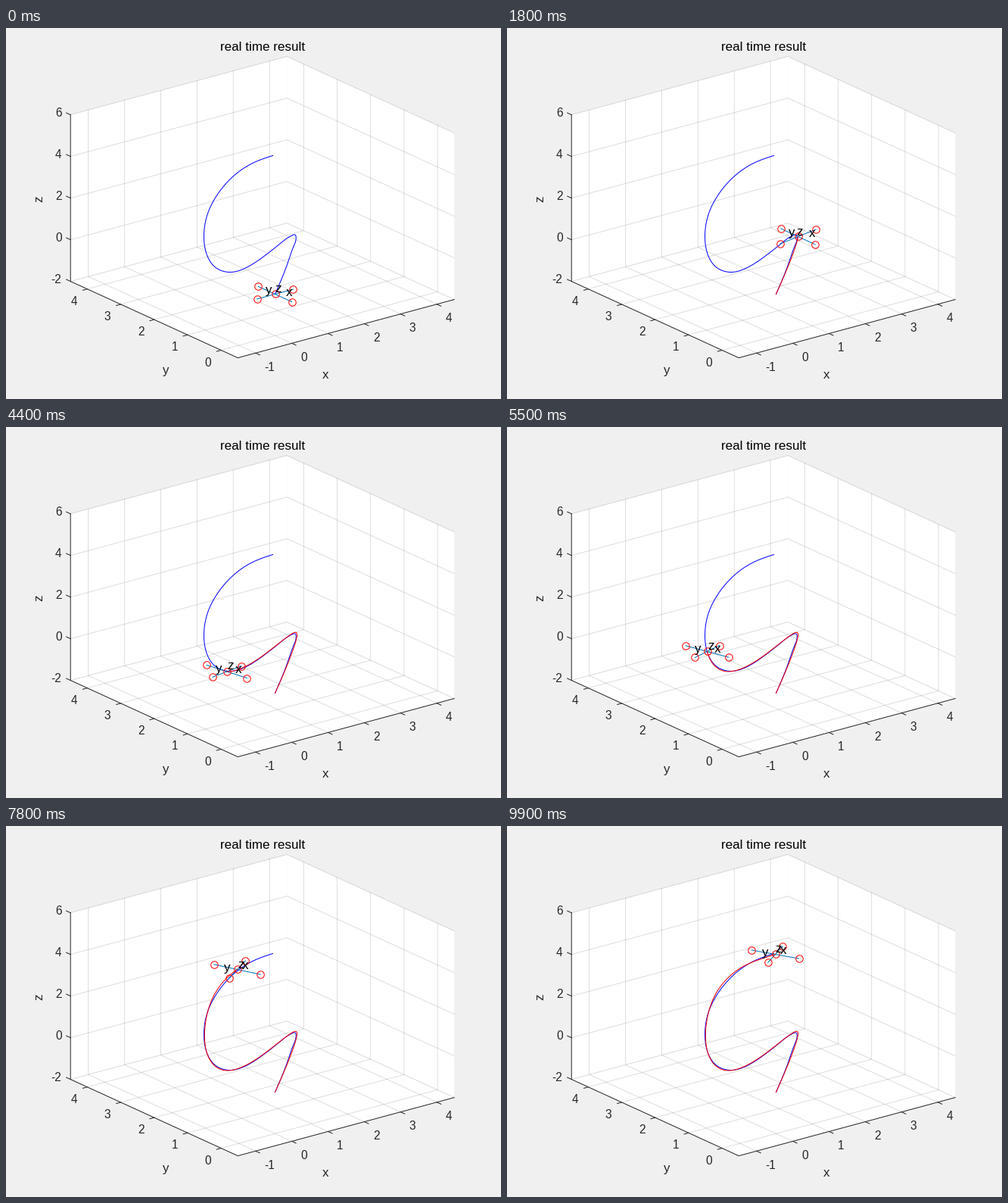
Recreate the animation shown at these times as a matplotlib script. Size 654 by 490 pixels, loop 10 s.

```python
import numpy as np
import matplotlib.pyplot as plt
from matplotlib.animation import FuncAnimation

W, H, DPI = 654, 490, 100
FRAMES, STEP = 100, 100
PX = 72 / DPI                       # one pixel in points
INK = (0.15, 0.15, 0.15)
plt.rcParams["font.family"] = "Liberation Sans"

# Orthographic projection: screen vector of each unit axis
ORIGIN = np.array([355.0, 350.8])
AXES = np.array([[47.9, -12.9], [-44.2, -20.2], [0.0, -27.5]])
XLIM, YLIM, ZLIM = (-1.49, 4.48), (-0.5, 4.5), (-2, 6)


def project(*p):
    return ORIGIN + np.array(p, float) @ AXES


def spline(t, p, q, clamped=False):
    """C2 cubic spline through p at times t, sampled at q."""
    t, p, q = (np.asarray(v, float) for v in (t, p, q))
    n, h = len(t), np.diff(t)
    d = np.diff(p, axis=0) / h[:, None]
    A, r = np.zeros((n, n)), np.zeros_like(p)
    for i in range(1, n - 1):
        A[i, i - 1:i + 2] = h[i], 2 * (h[i - 1] + h[i]), h[i - 1]
        r[i] = 3 * (h[i] * d[i - 1] + h[i - 1] * d[i])
    if clamped:
        A[0, 0] = A[-1, -1] = 1
    else:
        A[0, :2], r[0] = (2, 1), 3 * d[0]
        A[-1, -2:], r[-1] = (1, 2), 3 * d[-1]
    m = np.linalg.solve(A, r)
    k = np.clip(np.searchsorted(t, q, side="right") - 1, 0, n - 2)
    hk = h[k][:, None]
    u = (q - t[k])[:, None] / hk
    return (p[k] * (1 + 2 * u) * (1 - u) ** 2 + m[k] * hk * u * (1 - u) ** 2
            + p[k + 1] * u * u * (3 - 2 * u) + m[k + 1] * hk * u * u * (u - 1))


# Planned path, in screen pixels
plan = np.array([
    (355, 351), (372, 309), (379.5, 288), (382.7, 277), (381.5, 272.6),
    (377, 273.6), (362, 284), (339, 302), (318, 315.5), (295, 322),
    (276, 315.5), (264.2, 297), (261, 275), (265.5, 246), (276.5, 223),
    (291, 204), (307.5, 189), (329, 176.3), (352, 168)])
chord = np.r_[0, np.cumsum(np.hypot(*np.diff(plan, axis=0).T))]
planned = spline(chord, plan, np.linspace(0, chord[-1], 500))

# Flight: time, screen x, screen y, pitch slope, roll slope
flight = np.array([
    (0.0, 355, 351, 0, 0),
    (1.1, 373, 309, 0, -0.09),
    (1.8, 384, 275, 0.2, 0.04),
    (2.2, 380.7, 271, 0.18, 0.04),
    (3.3, 339, 301.4, 0.04, 0.015),
    (4.4, 291.3, 322.5, -0.07, 0),
    (5.5, 264, 296, -0.09, 0),
    (6.6, 268, 238, 0.07, 0.07),
    (6.9, 274.3, 223, 0.1, 0.08),
    (7.8, 305, 189, 0.08, 0.05),
    (8.8, 341, 173.3, 0.03, 0.02),
    (9.9, 354, 169, 0, 0)])
SUB = 5
times = np.arange((FRAMES - 1) * SUB + 1) * STEP / 1000 / SUB
state = spline(flight[:, 0], flight[:, 1:], times, clamped=True)


def body_axes(t, pitch, roll):
    """Screen vectors of the body axes; yaw eases from 0 to 30 degrees."""
    s = t / 10
    yaw = np.radians(30) * s ** 3 * (10 - 15 * s + 6 * s * s)
    c, n = np.cos(yaw), np.sin(yaw)
    return np.array([(c, n, pitch), (-n, c, roll),
                     (roll * n - pitch * c, -pitch * n - roll * c, 1)]) @ AXES


fig = plt.figure(figsize=(W / DPI, H / DPI), dpi=DPI, facecolor="#f0f0f0")
ax = fig.add_axes([0, 0, 1, 1])
ax.set_xlim(-0.5, W - 0.5)
ax.set_ylim(H - 0.5, -0.5)
ax.axis("off")


def line(*pts, color=INK, z=2, **kw):
    return ax.plot(*np.array(pts).T, color=color, lw=PX, zorder=z, **kw)[0]


def text(x, y, s, size, color=INK, ha="center", va="baseline", **kw):
    return ax.text(x, y, s, fontsize=size * PX, color=color, ha=ha, va=va,
                   zorder=9, **kw)


def grid(*pts):
    line(*pts, z=1, alpha=0.15)


(x0, x1), (y0, y1), (z0, z1) = XLIM, YLIM, ZLIM
walls = [[(x0, y1, z0), (x1, y1, z0), (x1, y1, z1), (x0, y1, z1)],
         [(x1, y0, z0), (x1, y1, z0), (x1, y1, z1), (x1, y0, z1)],
         [(x0, y0, z0), (x1, y0, z0), (x1, y1, z0), (x0, y1, z0)]]
for wall in walls:
    ax.fill(*np.array([project(*p) for p in wall]).T, color="white", lw=0,
            zorder=0)

TICK = 15.5
for x in range(-1, 5):
    p = project(x, y0, z0)
    grid(p, project(x, y1, z0), project(x, y1, z1))
    line(p, p + (5.5, 2.5))
    text(p[0] + 11.5, p[1] + 23.5, str(x), TICK, ha="left")
for y in range(5):
    p = project(x0, y, z0)
    grid(p, project(x1, y, z0), project(x1, y, z1))
    line(p, p + (-5.8, 1.6))
    text(p[0] - 13, p[1] + 21, str(y), TICK, ha="right")
for z in range(-2, 7, 2):
    p = project(x0, y1, z)
    grid(p, project(x1, y1, z), project(x1, y0, z))
    line(p, p + (-5.5, -2.5))
    text(73, p[1] + 2.5, str(z), TICK, ha="right")
line(project(x0, y1, z1), project(x0, y1, z0), project(x0, y0, z0),
     project(x1, y0, z0))

text(339, 30, "real time result", 17, "black")
text(422, 462.5, "x", 17)
text(210, 456, "y", 17)
text(43, 225, "z", 17, va="center", rotation=90)

line(*planned, color="blue", z=3)
arms = [line((0, 0), (0, 0), color="#0072bd", z=4) for _ in range(2)]
trail = line((0, 0), (0, 0), color="red", z=5)
rotors = line((0, 0), (0, 0), color="red", z=6, ls="", marker="o",
              ms=9.5 * PX, mfc="none", mew=PX)
names = [text(0, 0, s, 17, "black", ha="left") for s in "xyz"]


def draw(i):
    k = i * SUB
    pos, (pitch, roll) = state[k, :2], state[k, 2:]
    body = body_axes(times[k], pitch, roll)
    ends = []
    for arm, v in zip(arms, body):
        pair = [pos - v / 2, pos + v / 2]
        arm.set_data(*np.array(pair).T)
        ends += pair
    rotors.set_data(*np.array(ends + [pos]).T)
    trail.set_data(*state[:k + 1, :2].T)
    for name, v in zip(names, body):
        name.set_position(pos + 0.3 * v + (0, 6))
    return [*arms, rotors, trail, *names]


anim = FuncAnimation(fig, draw, frames=FRAMES, interval=STEP, repeat=True,
                     repeat_delay=0, blit=False)
plt.show()
```
